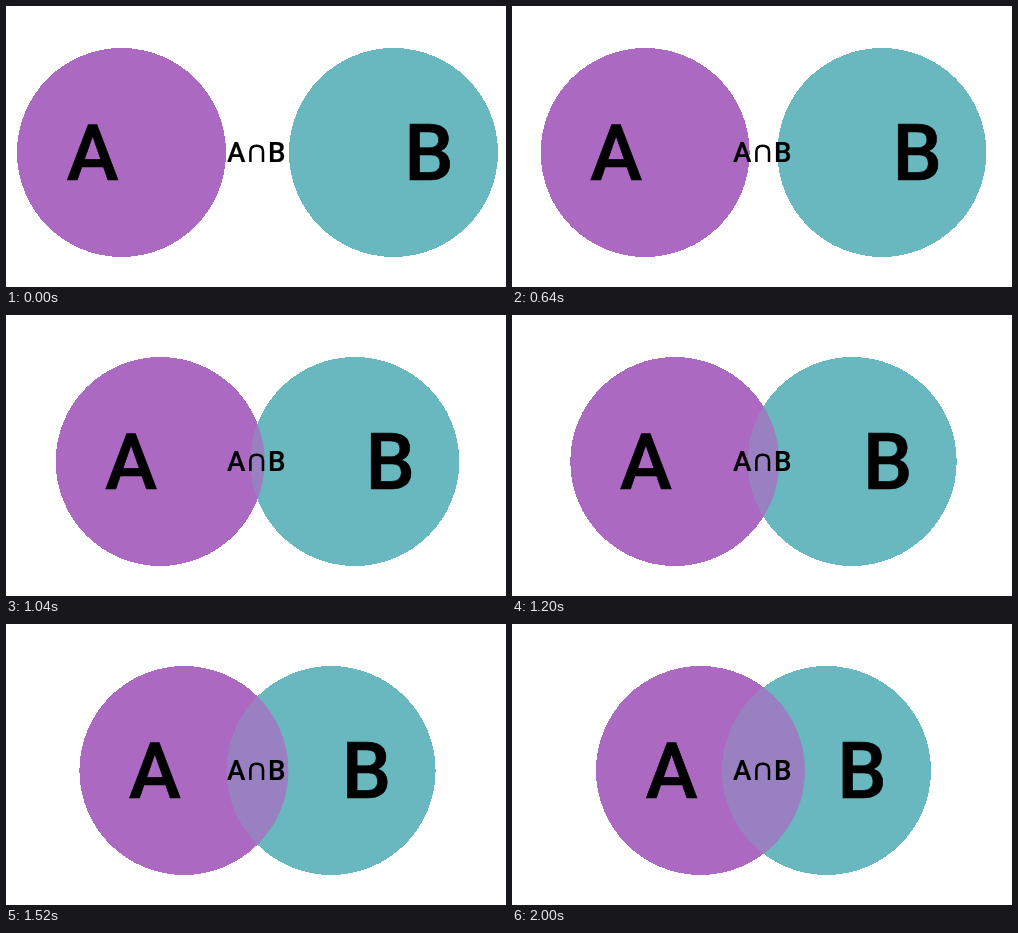
Write an HTML page that moves like this. It is 500x281 px and loops after 3 s.

```html
<!DOCTYPE html>
<html lang="en">
<head>
<meta charset="utf-8">
<title>Intersection of two sets</title>
<style>
  html, body { margin: 0; width: 100%; height: 100%; overflow: hidden; background: #fff; }
  svg { display: block; width: 100%; height: 100%; }
  circle { shape-rendering: crispEdges; }
  text {
    font: 500 78.4px Roboto, Inter, sans-serif;
    text-anchor: middle;
    stroke: #000;
    stroke-width: .6;
  }
  .label text { font-size: 27.7px; stroke-width: .2; }
</style>
</head>
<body>
<svg viewBox="0 0 500 281" role="img" aria-label="A∩B">
  <defs>
    <clipPath id="inA"><circle id="clip" cy="146.5" r="104.5"/></clipPath>
  </defs>
  <circle id="discA" cy="146.5" r="104.5" fill="#ab69c2"/>
  <circle id="discB" cy="146.5" r="104.5" fill="#69b8c0"/>
  <g clip-path="url(#inA)">
    <circle id="lens" cy="146.5" r="104.5" fill="#9880c1"/>
  </g>
  <text id="nameA" y="174.2">A</text>
  <text id="nameB" y="174.2">B</text>
  <g class="label">
    <text x="230.1" y="155.8">A</text>
    <path d="M244.4 155.9V145.6c0-3.8 2.3-5.8 6.3-5.8s6.3 2 6.3 5.8V155.9" fill="none" stroke="#000" stroke-width="2.5"/>
    <text x="270.8" y="155.8">B</text>
  </g>
</svg>
<script>
  const LOOP = 3000, MOVE = 2000, STEP = 40, TRAVEL = 73;
  const $ = id => document.getElementById(id);
  const smooth = p => p * p * (3 - 2 * p);

  function draw(ms) {
    const t = Math.floor((ms % LOOP) / STEP) * STEP;
    const shift = TRAVEL * smooth(Math.min(t / MOVE, 1));
    const a = 115.5 + shift;
    const b = 387.5 - shift;
    for (const id of ['discA', 'clip']) $(id).setAttribute('cx', a);
    for (const id of ['discB', 'lens']) $(id).setAttribute('cx', b);
    $('nameA').setAttribute('x', a - 29);
    $('nameB').setAttribute('x', b + 35.5);
  }

  const start = performance.now();
  function tick() {
    draw(performance.now() - start);
    requestAnimationFrame(tick);
  }
  tick();
</script>
</body>
</html>
```
